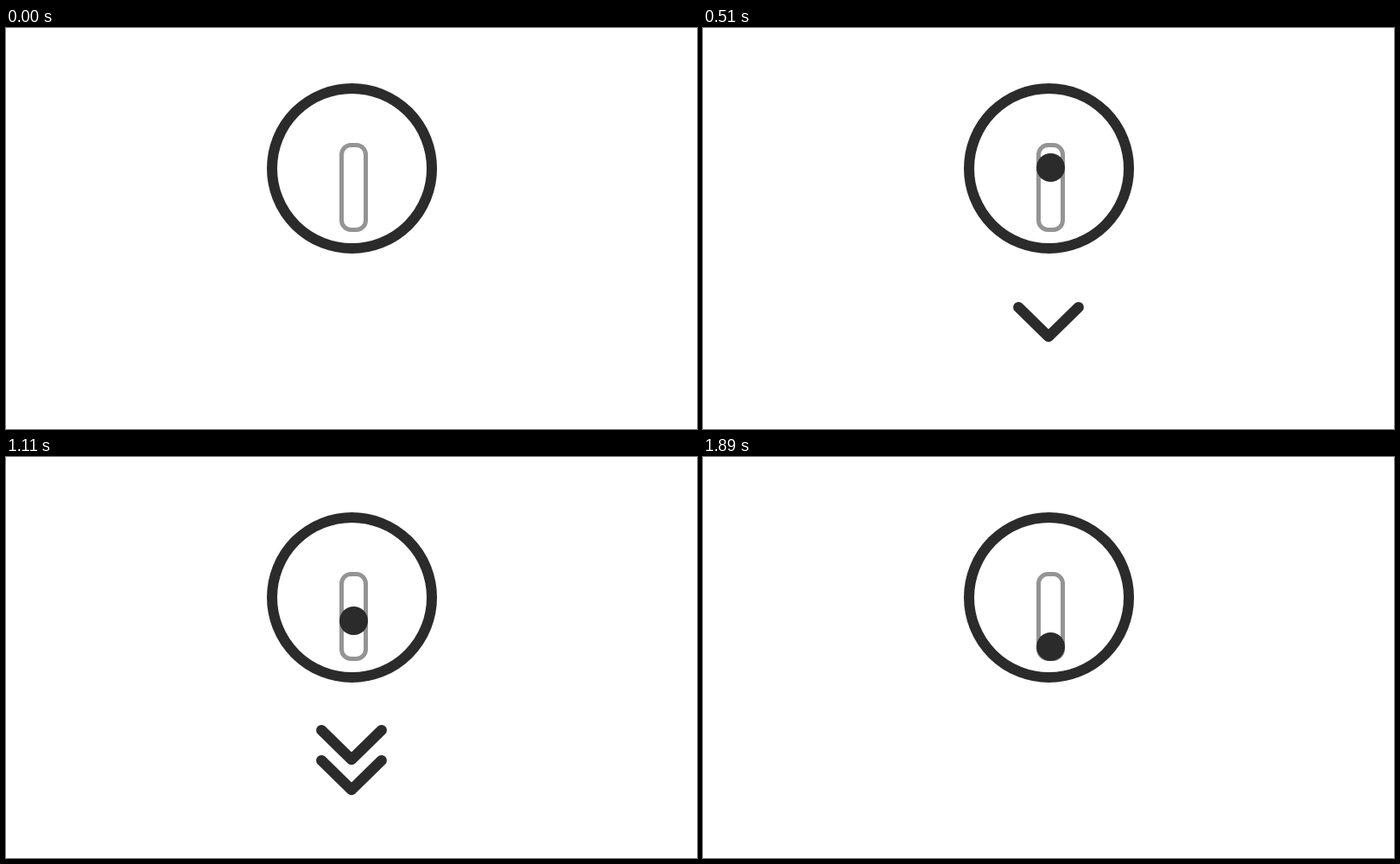
An HTML page that plays this animation: 800x464 px, repeating every 1.92 s.

```html
<!DOCTYPE html>
<html lang="en">
<head>
<meta charset="utf-8">
<title>Scroll hint</title>
<style>
  html, body { margin: 0; width: 100%; height: 100%; overflow: hidden; background: #fff; }
  svg { display: block; width: 800px; height: 464px; }
  .line { fill: none; stroke: #2b2b2b; }
  .chevron { stroke-width: 12.4; stroke-linecap: round; stroke-linejoin: round; }
</style>
</head>
<body>
<svg viewBox="0 0 800 464">
  <circle class="line" cx="400.5" cy="162.5" r="92.5" stroke-width="12"/>
  <rect class="line" x="388.5" y="135.5" width="28" height="98" rx="11" stroke-width="5" stroke-opacity=".5"/>
  <circle id="dot" cx="402.5" r="16.5" fill="#2b2b2b"/>
  <path id="upper" class="line chevron" d="M-34.7-34 0 0 34.7-34"/>
  <path id="lower" class="line chevron" d="M-34.7-34 0 0 34.7-34"/>
</svg>
<script>
  const LOOP = 1920, TICK = 30;
  const [dot, upper, lower] = ['dot', 'upper', 'lower'].map(id => document.getElementById(id));

  // [time in ms, centre of the dot]
  const path = [[0, 149.5], [240, 149.5], [330, 153.5], [540, 162.5], [660, 169.5], [900, 180.5],
    [1080, 188.5], [1350, 199.5], [1620, 210.5], [1860, 219.5], [1920, 219.5]];

  const ramp = (t, from, to) => Math.min(1, Math.max(0, (t - from) / (to - from)));

  function dotY(t) {
    const i = path.findIndex(p => p[0] > t);
    const [t0, y0] = path[i - 1], [t1, y1] = path[i];
    return Math.round(y0 + (y1 - y0) * ramp(t, t0, t1) - 0.5) + 0.5;
  }

  function place(chevron, y, opacity) {
    chevron.setAttribute('transform', `translate(400 ${y})`);
    chevron.setAttribute('opacity', opacity);
  }

  function draw(t) {
    const y = dotY(t);
    dot.setAttribute('cy', y);
    dot.setAttribute('opacity', ramp(t, 0, 220));
    place(lower, y + 195.6, ramp(t, 0, 220) - ramp(t, 1640, 1880));
    // The upper chevron waits until the lower one is 35 px ahead.
    place(upper, Math.max(340.1, y + 160.6), ramp(t, 560, 780) - ramp(t, 1370, 1600));
  }

  const start = performance.now();
  function frame() {
    const t = (performance.now() - start) % LOOP;
    draw(Math.floor(t / TICK) * TICK);
    requestAnimationFrame(frame);
  }
  frame();
</script>
</body>
</html>
```
